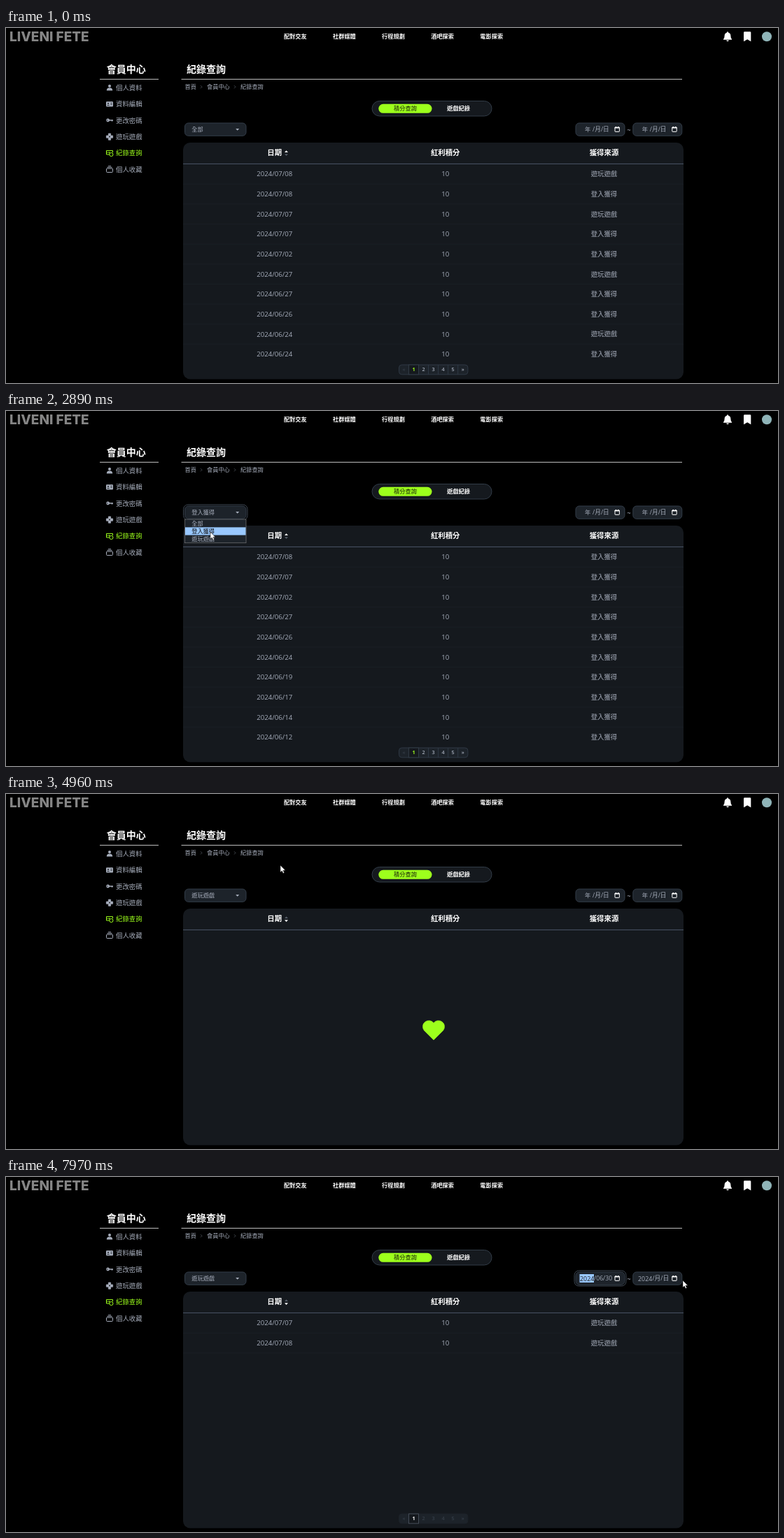
Write an HTML page that moves like this. It is 1103 px wide and 508 px high and loops after 8 s.

```html
<!DOCTYPE html>
<html lang="zh-Hant">
<head>
<meta charset="utf-8">
<title>紀錄查詢</title>
<style>
  html, body { margin: 0; width: 100%; height: 100%; overflow: hidden; background: #000; }
  svg { display: block; font-family: 'Open Sans', 'Noto Sans CJK TC', 'Noto Sans CJK JP', 'Noto Sans CJK', sans-serif; }
</style>
</head>
<body>
<svg width="1103" height="508" viewBox="0 0 1103 508"><g id="page"></g><g id="live"></g></svg>
<script>
const LOOP = 8000;
const GREEN = '#9dff1c', GRAY = '#a6adbb', WHITE = '#fff', CARD = '#15191e', FIELD = '#1d232a',
  EDGE = '#323c48', DIM = '#363e48', BLUE = '#99c8ff';
const GAME = '遊玩遊戲', LOGIN = '登入獲得', OPTIONS = ['全部', LOGIN, GAME];

// Drawing helpers; y is the vertical centre of a line of text
const text = (x, y, str, size, fill, anchor = 'start', weight = 400) =>
  `<text x="${x}" y="${y + size * .36}" font-size="${size}" fill="${fill}" text-anchor="${anchor}" font-weight="${weight}">${str}</text>`;
const mid = (x, y, str, size, fill, weight) => text(x, y, str, size, fill, 'middle', weight);
const rect = (x, y, w, h, r, fill, stroke = 'none', width = 1) =>
  `<rect x="${x}" y="${y}" width="${w}" height="${h}" rx="${r}" fill="${fill}" stroke="${stroke}" stroke-width="${width}"/>`;
const path = (d, fill, stroke = 'none', width = 1) =>
  `<path d="${d}" fill="${fill}" stroke="${stroke}" stroke-width="${width}"/>`;
const circle = (x, y, r, fill, stroke = 'none') =>
  `<circle cx="${x}" cy="${y}" r="${r}" fill="${fill}" stroke="${stroke}"/>`;

const clamp = v => Math.min(1, Math.max(0, v));
const smooth = v => v * v * (3 - 2 * v);

// What the table shows from each time on; null is the loading heart
const rows = list => list.split(' ').map(s => ['20' + s.slice(0, 8), s[8] === 'l' ? LOGIN : GAME]);
const VIEWS = [
  [-999, rows('24/07/08 24/07/08l 24/07/07 24/07/07l 24/07/02l 24/06/27 24/06/27l 24/06/26l 24/06/24 24/06/24l')],
  [1680, null],
  [2410, rows('24/07/08l 24/07/07l 24/07/02l 24/06/27l 24/06/26l 24/06/24l 24/06/19l 24/06/17l 24/06/14l 24/06/12l')],
  [3250, null],
  [3420, rows('24/07/08 24/07/07 24/06/27 24/06/24 24/06/17 24/06/14 24/06/03 24/05/31 24/05/27 24/05/24')],
  [4310, null],
  [5090, rows('23/03/31 23/04/01 23/04/02 23/04/03 23/12/27 23/12/27 24/02/29 24/03/01 24/03/03 24/03/04')],
  [7460, null],
  [7940, rows('24/07/07 24/07/08')],
];

// Pointer stops: time, x, y
const POINTER = [
  [30, 1055, 504], [780, 300, 145], [1010, 300, 145], [1310, 290, 171], [1650, 290, 171],
  [2170, 412.5, 124], [2400, 398, 126], [2440, 398, 126], [2720, 300, 146], [2960, 290, 180],
  [3250, 290, 180], [3590, 394, 112], [3860, 394, 116], [4130, 400, 179], [4380, 400, 179],
  [4960, 392, 102], [5560, 392, 102], [6170, 869.5, 156.5], [6400, 872, 142], [6710, 872, 142],
  [7230, 833, 204], [7440, 833, 204], [7960, 967, 148],
];

function pointerAt(t) {
  const i = POINTER.findIndex(p => p[0] > t);
  if (i < 0) return POINTER.at(-1).slice(1);
  if (!i) return null;
  const [t0, x0, y0] = POINTER[i - 1], [t1, x1, y1] = POINTER[i];
  const k = smooth((t - t0) / (t1 - t0));
  return [x0 + (x1 - x0) * k, y0 + (y1 - y0) * k];
}

function drawPage() {
  const menu = ['個人資料', '資料編輯', '更改密碼', GAME, '紀錄查詢', '個人收藏'];
  const icons = [
    circle(148, 83, 2, GRAY) + path('M143.8 89.5q0-4 4.2-4t4.2 4z', GRAY),
    rect(143, 105.3, 10, 7.2, 1, GRAY) + path('M144.5 110.5h3M149.5 107.5h2M149.5 109.5h2', 'none', CARD, .9) + circle(146, 108, 1, CARD),
    circle(145.6, 132, 2.4, GRAY) + path('M147 132h6M151.5 132v1.5', 'none', GRAY, 1.6) + circle(145, 132, .7, '#000'),
    path('M146.4 151h3.2v3h3v3.2h-3v3h-3.2v-3h-3V154h3z', GRAY, GRAY, .8) + circle(148, 155.6, 1, CARD),
    path('M149 181h-5.5v-5.6h9V178M145 177.5v1.5', 'none', GREEN) + circle(150.4, 181, 2.6, '#000', GREEN) + circle(147.5, 178.2, 1, GREEN),
    rect(143.5, 201, 9, 5.5, 1, 'none', GRAY) + path('M144.5 199.3h7M146 197.6h4', 'none', GRAY, .9),
  ];
  return text(5, 12.5, 'LIVENI FETE', 19, '#858585', 'start', 800).replace('<text', '<text font-family="Inter, sans-serif"') +
    ['配對交友', '社群媒體', '行程規劃', '酒吧探索', '電影探索']
      .map((s, i) => mid(413.3 + 70.1 * i, 12.3, s, 8.2, WHITE, 700)).join('') +
    path('M1031 5.2q1 0 1 1.2q3.4.9 3.4 4.8q0 3.4 1.6 4.8v.7h-12v-.7q1.6-1.4 1.6-4.8q0-3.9 3.4-4.8q0-1.2 1-1.2zM1029.2 17.5h3.6q-.3 1.7-1.8 1.7t-1.8-1.7z', WHITE) +
    path('M1054 6.5q0-1.3 1.3-1.3h7.7q1.3 0 1.3 1.3v12.8l-5.1-3-5.2 3z', WHITE) +
    circle(1087, 12.3, 7, '#8fb4b8') +
    mid(171.8, 59, '會員中心', 14, WHITE, 700) + text(258, 59, '紀錄查詢', 14, WHITE, 'start', 700) +
    path('M134 73.3h84M250.5 73.3h715.5', 'none', '#c8c8c8') +
    menu.map((s, i) => icons[i] + text(157, 85.5 + 23.35 * i, s, 9.4, i === 4 ? GREEN : GRAY)).join('') +
    text(255.5, 84.3, '首頁', 8.2, GRAY) + text(287, 84.3, '會員中心', 8.2, GRAY) + text(335, 84.3, '紀錄查詢', 8.2, GRAY) +
    path('M278 82.3l2 2-2 2M326 82.3l2 2-2 2', 'none', '#555b64', .8) +
    rect(523, 104.5, 171, 21.5, 10.7, CARD, EDGE) + rect(532.3, 108.8, 76.2, 13, 6.5, GREEN) +
    mid(570.5, 115.3, '積分查詢', 8.2, '#182008') + mid(646.5, 115.3, '遊戲紀錄', 8.2, WHITE, 700) +
    rect(253, 164, 715, 338.5, 10, CARD) + path('M253 194.4h715', 'none', '#4a5666') +
    mid(383.7, 178.3, '日期', 10.4, WHITE, 700) + mid(627.7, 178.3, '紅利積分', 10.4, WHITE, 700) +
    mid(854.5, 178.3, '獲得來源', 10.4, WHITE, 700) + mid(890, 145.5, '~', 9.5, GRAY);
}

const ring = (x, w) => rect(x - 2, 134, w + 4, 22, 6.5, 'none', '#3c4652');

function drawSelect(t, pointer) {
  const chosen = t < 1650 ? 0 : t < 3230 ? 1 : 2;
  const focused = t > 1030 && t < 4290;
  const open = t > 1040 && t < 1650 || t > 2740 && t < 3230;
  let out = (focused ? ring(255.5, 87.5) : '') + rect(255.5, 136, 87.5, 18.3, 5, FIELD, EDGE) +
    text(265.3, 145.3, OPTIONS[chosen], 8.2, GRAY) + path('M328.2 144h5l-2.5 2.7z', GRAY);
  if (open) {
    const over = Math.floor((pointer[1] - 155) / 11.2);
    const active = over < 0 ? chosen : Math.min(2, over);
    out += rect(255.5, 155, 87.5, 33.8, 0, FIELD, '#858585', .6) + OPTIONS.map((s, i) =>
      (i === active ? rect(256, 155.2 + 11.2 * i, 86.5, 11.2, 0, BLUE) : '') +
      text(265.3, 160.8 + 11.2 * i, s, 8.2, i === active ? '#111' : GRAY)).join('');
  }
  return out;
}

function drawDate(x, year, yearX, rest, restX, focused) {
  const width = year === '年' ? 14 : 20.5;
  return (focused ? ring(x, 70) + '' : '') + rect(x, 136, 70, 18.3, 5, FIELD, EDGE) +
    (focused ? rect(yearX - (year === '年' ? 2.8 : .5), 139, width, 12, 0, BLUE) : '') +
    text(yearX, 145.3, year, year === '年' ? 8.2 : 8.9, focused ? '#222' : GRAY) +
    text(restX, 145.3, rest, 8.7, GRAY) +
    rect(x + 56, 142.2, 6.4, 6.2, .6, 'none', WHITE, 1) + path(`M${x + 55.6} 142.8h7.2M${x + 57.4} 141v1M${x + 61} 141v1`, 'none', WHITE, 1.4);
}

function drawDates(t) {
  return t < 7450
    ? drawDate(814, '年', 827, '/月/日', 838, t > 6430) + drawDate(895.8, '年', 908.8, '/月/日', 919.8, false)
    : drawDate(814, '2024', 820, '/06/30', 840, true) + drawDate(895.8, '2024', 903, '/月/日', 923.4, false);
}

function drawTable(t) {
  const [start, list] = VIEWS.findLast(v => v[0] <= t);
  if (!list) return path('M611 352L597.2 338.2A8.7 8.7 0 0 1 611 327.6A8.7 8.7 0 0 1 624.8 338.2Z', GREEN, GREEN, .5);
  let out = '';
  list.forEach(([date, source], i) => {
    const y = 209 + 28.63 * i;
    out += mid(383.7, y, date, 9.65, GRAY) + mid(627.7, y, '10', 9.65, GRAY) + mid(854.5, y, source, 9.4, GRAY);
    if (i < 9) out += path(`M253 ${y + 14.3}h715`, 'none', '#1a1f25');
  });
  // The current page number fades from white to green
  const fade = smooth(clamp((t - start - 50) / 110));
  const current = `rgb(${255 - 98 * fade},255,${255 - 227 * fade})`;
  const off = list.length < 10;
  out += rect(561.5, 482, 98.4, 13.8, 4, FIELD, off ? FIELD : EDGE, .9);
  ['«', 1, 2, 3, 4, 5, '»'].forEach((s, i) => {
    const x = 568.4 + 14.05 * i;
    if (i && !off) out += path(`M${x - 7} 482v13.8`, 'none', EDGE, .9);
    if (i === 1) out += rect(x - 7, 482, 14, 13.8, 0, CARD, off ? '#4a525c' : EDGE, .9);
    out += mid(x, 488.8, s, 7.2, i === 1 ? current : !i || off ? DIM : GRAY, i === 1 ? 700 : 600);
  });
  return out;
}

function drawCalendar(t) {
  if (t < 6460 || t > 7440) return '';
  const pressed = t > 7250;
  const scroll = Math.max(0, (t - 7260) / 60);
  const colX = c => 833.4 + 16.37 * c;
  let cells = '';
  for (let r = -6; r < 6; r++) {
    const y = 208.5 + 16.35 * (r + scroll);
    if (y < 190 || y > 305) continue;
    for (let c = 0; c < 7; c++) {
      const n = 7 * r + c, day = new Date(2024, 5, 30 + n).getDate();
      const picked = pressed && n === 0;
      if (picked) cells += rect(colX(c) - 8, y - 8, 16, 16, 1, BLUE);
      if (n === 8) cells += rect(colX(c) - 7.8, y - 7.8, 15.6, 15.6, 1, 'none', '#8a8a8a', .8);
      cells += mid(colX(c), y, day, 7.2, picked ? '#333' : n > 8 ? '#777' : WHITE, n > 8 ? 400 : 600);
    }
  }
  return rect(819.3, 154.5, 126.7, 164, 1.5, '#3b3b3b', '#858585', .9) +
    text(825, 168.3, `2024年0${scroll > .5 ? 6 : 7}月`, 7.1, WHITE, 'start', 700) + path('M865 167h4.4l-2.2 2.5z', WHITE) +
    path('M913 173v-9m-4 4l4-4.2 4 4.2M931.7 164v9m-4-4l4 4.2 4-4.2', 'none', WHITE, .9) +
    [...'日一二三四五六'].map((s, c) => mid(colX(c), 189, s, 7.4, WHITE)).join('') +
    `<clipPath id="days"><path d="M820 199.5h125v99h-125z"/></clipPath><g clip-path="url(#days)">${cells}</g>` +
    text(831.6, 307.3, '清除', 7.2, BLUE) + text(919.2, 307.3, '今天', 7.2, BLUE);
}

function drawSort(t) {
  const down = t > 4290;
  return path('M398 178h5l-2.5-2.8z', down ? '#555d68' : WHITE) + path('M398 180.2h5l-2.5 2.8z', down ? WHITE : '#555d68');
}

const drawPointer = ([x, y]) =>
  path(`M${x} ${y}v10l2.3-2.1 1.6 3.6 1.7-.8-1.6-3.5h3.1z`, WHITE, '#111', .5);

const live = document.getElementById('live');
document.getElementById('page').innerHTML = drawPage();

function frame(now) {
  const t = now % LOOP, pointer = pointerAt(t);
  live.innerHTML = drawSort(t) + drawTable(t) + drawSelect(t, pointer) + drawDates(t) +
    drawCalendar(t) + (pointer ? drawPointer(pointer) : '');
  requestAnimationFrame(frame);
}
frame(performance.now());
</script>
</body>
</html>
```
